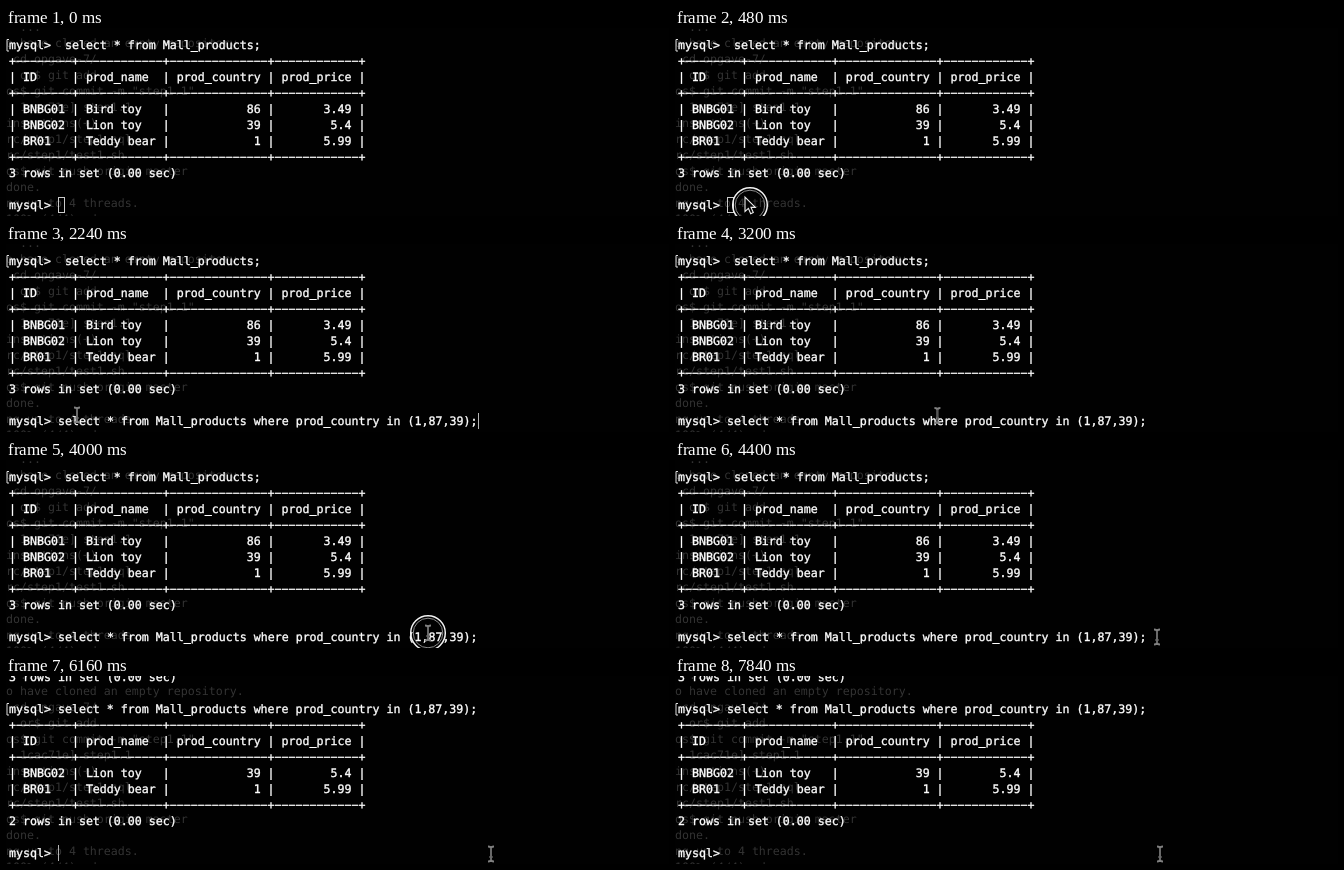
An HTML page that plays this animation: 663 px wide and 188 px high, repeating every 8000 ms.

```html
<!DOCTYPE html>
<html lang="en">
<head>
<meta charset="utf-8">
<title>SQL terminal</title>
<style>
html, body { margin: 0; width: 100%; height: 100%; overflow: hidden; background: #010101; }
svg { display: block; width: 663px; height: 188px; }
text { font: 11.627px "DejaVu Sans Mono", monospace; white-space: pre; text-rendering: geometricPrecision; }
#ghost { fill: #333; }
#before, #after, #typed { fill: #fff; }
#before text, #after text, #typed text { stroke: #fff; stroke-width: 0.35px; }
path, circle, rect { fill: none; }
</style>
</head>
<body>
<svg viewBox="0 0 663 188">
  <rect width="663" height="188" style="fill:#010101"/>
  <g id="ghost"></g>
  <g id="before"></g>
  <g id="after"></g>
  <g id="typed"></g>
  <rect id="box" x="52.5" y="169.5" width="6" height="15" stroke="#ccc"/>
  <rect id="bar" y="169" width="1" height="16" style="fill:#b4b4b4"/>
  <g id="ring">
    <circle r="17.3" stroke="#f2f2f2" stroke-width="1.5"/>
    <circle r="14.8" stroke="#8a8a8a" stroke-width="1"/>
  </g>
  <path id="arrow" d="M0 0V14.5L3.4 11.4L5.7 16.7L8.3 15.5L6 10.4H10.4Z" style="fill:#050505" stroke="#eee" stroke-width="1.1"/>
  <g id="beam">
    <path d="M-3 -7.5Q0 -7.5 0 -5.5Q0 -7.5 3 -7.5M0 -5.5V5.5M-3 7.5Q0 7.5 0 5.5Q0 7.5 3 7.5M-1.5 3H1.5" stroke="#808080" stroke-width="2"/>
    <path d="M0 -6V6" stroke="#333" stroke-width="0.6"/>
  </g>
</svg>
<script>
const LOOP = 8000, STEP = 80, CELL = 7, LEFT = 3, LINE = 16;
const NS = "http://www.w3.org/2000/svg";
const $ = id => document.getElementById(id);
const show = (el, on) => el.setAttribute("visibility", on ? "visible" : "hidden");
const place = (el, x, y) => el.setAttribute("transform", `translate(${x} ${y})`);

function add(parent, tag, attrs, text = "") {
  const el = document.createElementNS(NS, tag);
  for (const key in attrs) el.setAttribute(key, attrs[key]);
  el.textContent = text;
  parent.appendChild(el);
}

function print(parent, lines, x, y) {
  lines.forEach((line, i) => line && add(parent, "text", { x, y: y + i * LINE }, line));
}

function bracket(parent, y) {
  add(parent, "path", { d: `M3 ${y - 9.5}H1V${y + 2}H3`, stroke: "#ddd" });
}

const widths = [6, 10, 12, 10];
// Minus signs give the long dashes of the terminal font
const rule = "+" + widths.map(w => "\u2212".repeat(w + 2) + "+").join("");
const row = cells => "|" + cells.map((c, i) =>
  ` ${i < 2 ? c.padEnd(widths[i]) : c.padStart(widths[i])} |`).join("");
const header = "| " + ["ID", "prod_name", "prod_country", "prod_price"]
  .map((c, i) => c.padEnd(widths[i])).join(" | ") + " |";
const table = rows => [rule, header, rule, ...rows.map(row), rule, `${rows.length} rows in set (0.00 sec)`];

const toys = [
  ["BNBG01", "Bird toy", "86", "3.49"],
  ["BNBG02", "Lion toy", "39", "5.4"],
  ["BR01", "Teddy bear", "1", "5.99"]
];
const query = "select * from Mall_products where prod_country in (1,87,39);";

print($("before"), ["mysql>  select * from Mall_products;", ...table(toys), "", "mysql> "], LEFT, 20.7);
bracket($("before"), 21);
print($("after"), ["3 rows in set (0.00 sec)", "", "mysql> " + query, ...table(toys.slice(1)), "", "mysql> "], LEFT, 4.7);
bracket($("after"), 37);
print($("typed"), [query], LEFT + 7 * CELL, 180.7);

// Another window showing faintly through the terminal
print($("ghost"), [
  " '...",
  "o have cloned an empty repository.",
  " cd opgave-7/",
  "  or$ git add",
  "os$ git commit -m \"step1.1\"",
  "  1cac71e] step1.1",
  "insertions(+)",
  "rc/step1/step1.sql",
  "rc/step1/test1.sh",
  "os$ git push origin master",
  "done.",
  "ng up to 4 threads.",
  "100% (4/4), done."
], 0, 2.5);

// Mouse path: time, x, y
const path = [
  [240, 316, 178], [320, 150, 175], [400, 76, 170], [480, 70, 169],
  [1440, 70, 169], [1600, 71, 171],
  [2720, 71, 171], [3600, 408, 172], [3840, 418, 173], [4000, 422, 173],
  [4080, 422, 173], [4400, 482, 177], [4640, 482, 178],
  [4720, 482, 178], [4960, 500, 178], [5120, 485, 178]
];

function mouseAt(t) {
  const i = path.findIndex(p => p[0] > t);
  if (i < 0) return path[path.length - 1].slice(1);
  const [a, b] = [path[Math.max(i - 1, 0)], path[i]];
  let k = Math.max(0, (t - a[0]) / (b[0] - a[0]));
  k = k * k * (3 - 2 * k);
  return [a[1] + (b[1] - a[1]) * k, a[2] + (b[2] - a[2]) * k];
}

const within = (t, from, to) => t >= from && t < to;

function draw(time) {
  const t = Math.floor((time % LOOP) / STEP) * STEP;
  const typed = within(t, 2240, 6160), done = t >= 6160;
  show($("before"), !done);
  show($("after"), done);
  show($("typed"), typed);

  // Blinking caret, lit again by focus, typing and Enter
  const blink = (t + 800) % 960 >= 480;
  const woken = within(t, 560, 640) || within(t, 2240, 2560) || within(t, 6160, 6400);
  show($("box"), t < 560);
  show($("bar"), t >= 560 && (blink || woken));
  $("bar").setAttribute("x", LEFT + 7 * CELL + (typed ? query.length * CELL : 0));

  const [x, y] = mouseAt(t);
  const beam = t >= 1520;
  show($("arrow"), t >= 240 && !beam);
  show($("beam"), beam);
  place($("arrow"), x, y);
  place($("beam"), x, y);

  const click = t < 4000 ? t - 480 : t - 4000;
  show($("ring"), within(click, 0, 160));
  $("ring").setAttribute("opacity", click < 80 ? 1 : 0.45);
  place($("ring"), beam ? x : x + 5, beam ? y : y + 8);
}

const start = performance.now();
function tick() {
  draw(performance.now() - start);
  requestAnimationFrame(tick);
}
tick();
</script>
</body>
</html>
```
